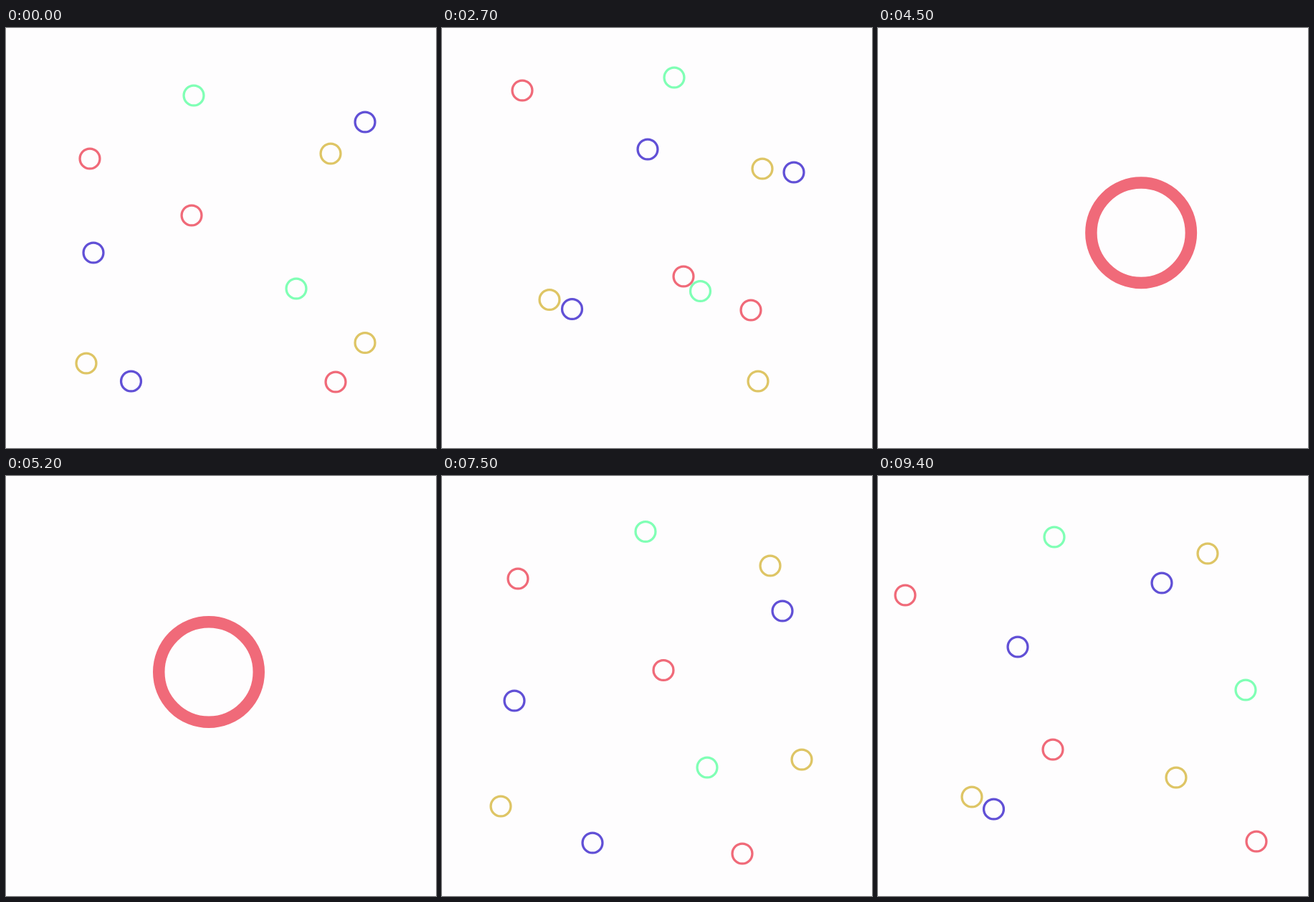
Write an HTML page with a canvas that moves like this. It is 600 px wide and 585 px high and loops after 9.5 s.

```html
<!DOCTYPE html>
<html lang="en">
<head>
<meta charset="utf-8">
<title>Drifting rings</title>
<style>
  html, body { margin: 0; width: 100%; height: 100%; overflow: hidden; background: #fefdfe; }
  canvas { display: block; }
</style>
</head>
<body>
<canvas id="stage" width="600" height="585"></canvas>
<script>
const LOOP = 9500, STEP = 100, DRIFT = 8000;
const RADIUS = 13.95, STROKE = 3.3, BIG = 5;
const RED = '#f06a79', BLUE = '#6150d6', GOLD = '#dec565', GREEN = '#80ffb5';
const ctx = document.getElementById('stage').getContext('2d');

// Waypoints at 0, 1300, 1400, 2700 and 7500 ms of the drift cycle; extras are [ms, x, y].
const TIMES = [0, 1300, 1400, 2700, 7500];
function ring(color, coords, extras = []) {
  const path = TIMES.map((ms, i) => [ms, coords[2 * i], coords[2 * i + 1]]);
  return { color, path: path.concat(extras).sort((a, b) => a[0] - b[0]) };
}

const rings = [
  ring(RED, [117, 182, 46, 167, 38, 166, 112, 87, 106, 143]),
  ring(RED, [460, 493, 528, 521, 528, 509, 431, 393, 419, 526]),
  ring(BLUE, [501, 131, 396, 140, 396, 149, 491, 201, 475, 188]),
  ring(BLUE, [122, 313, 201, 247, 195, 238, 287, 169, 101, 313]),
  ring(BLUE, [174.5, 492, 160, 469.5, 161.5, 464, 181.5, 391.5, 210, 511]),
  ring(GOLD, [453, 175, 470, 109, 460, 108, 447, 196, 458, 125]),
  ring(GOLD, [501, 438.5, 419, 415, 416, 420, 441, 492, 502, 395]),
  ring(GOLD, [112, 467, 129, 452, 131, 447, 150, 378.5, 82, 460]),
  ring(GREEN, [262, 94, 239, 83, 246, 85, 324, 69, 284, 77.5], [[700, 252, 58]]),
  ring(GREEN, [405, 363, 521, 303, 513, 298, 360.5, 366.5, 370, 406])
];
const hero = ring(RED, [259, 261, 241, 371, 244, 381, 337, 346, 309, 270.5], [
  [3700, 420, 326], [4000, 414, 304], [5000, 304, 277], [5200, 283, 273], [6000, 445, 238]
]);

// Waypoint of a closed path by any index, wrapping round the drift cycle.
function knot(path, i) {
  const n = path.length, turn = Math.floor(i / n);
  const [ms, x, y] = path[i - turn * n];
  return [ms + turn * DRIFT, x, y];
}

function slope(path, i, axis) {
  const [a, b, c] = [-1, 0, 1].map(d => knot(path, i + d));
  const before = b[0] - a[0], after = c[0] - b[0];
  return ((b[axis] - a[axis]) / before * after + (c[axis] - b[axis]) / after * before) / (before + after);
}

function position(path, t) {
  let i = path.length - 1;
  while (path[i][0] > t) i--;
  const a = knot(path, i), b = knot(path, i + 1), span = b[0] - a[0];
  const p = (t - a[0]) / span, q = 1 - p;
  return [1, 2].map(axis =>
    q * q * (1 + 2 * p) * a[axis] + p * p * (3 - 2 * p) * b[axis] +
    span * p * q * (q * slope(path, i, axis) - p * slope(path, i + 1, axis)));
}

function smooth(t, from, to) {
  const p = Math.min(1, Math.max(0, (t - from) / (to - from)));
  return p * p * (3 - 2 * p);
}

function drawRing({ color, path }, t, scale) {
  if (scale < 0.01) return;
  const [x, y] = position(path, t % DRIFT);
  ctx.strokeStyle = color;
  ctx.lineWidth = STROKE * scale;
  ctx.beginPath();
  ctx.arc(x, y, RADIUS * scale, 0, 2 * Math.PI);
  ctx.stroke();
}

function draw(now) {
  const t = Math.floor(now % LOOP / STEP) * STEP;
  const grown = smooth(t, 3150, 3950) - smooth(t, 6050, 6850);
  const hidden = smooth(t, 3150, 3650) - smooth(t, 6250, 6850);
  ctx.fillStyle = '#fefdfe';
  ctx.fillRect(0, 0, 600, 585);
  for (const item of rings) drawRing(item, t, 1 - hidden);
  drawRing(hero, t, 1 + (BIG - 1) * grown);
}

const start = performance.now();
function tick() {
  draw(performance.now() - start);
  requestAnimationFrame(tick);
}
tick();
</script>
</body>
</html>
```
